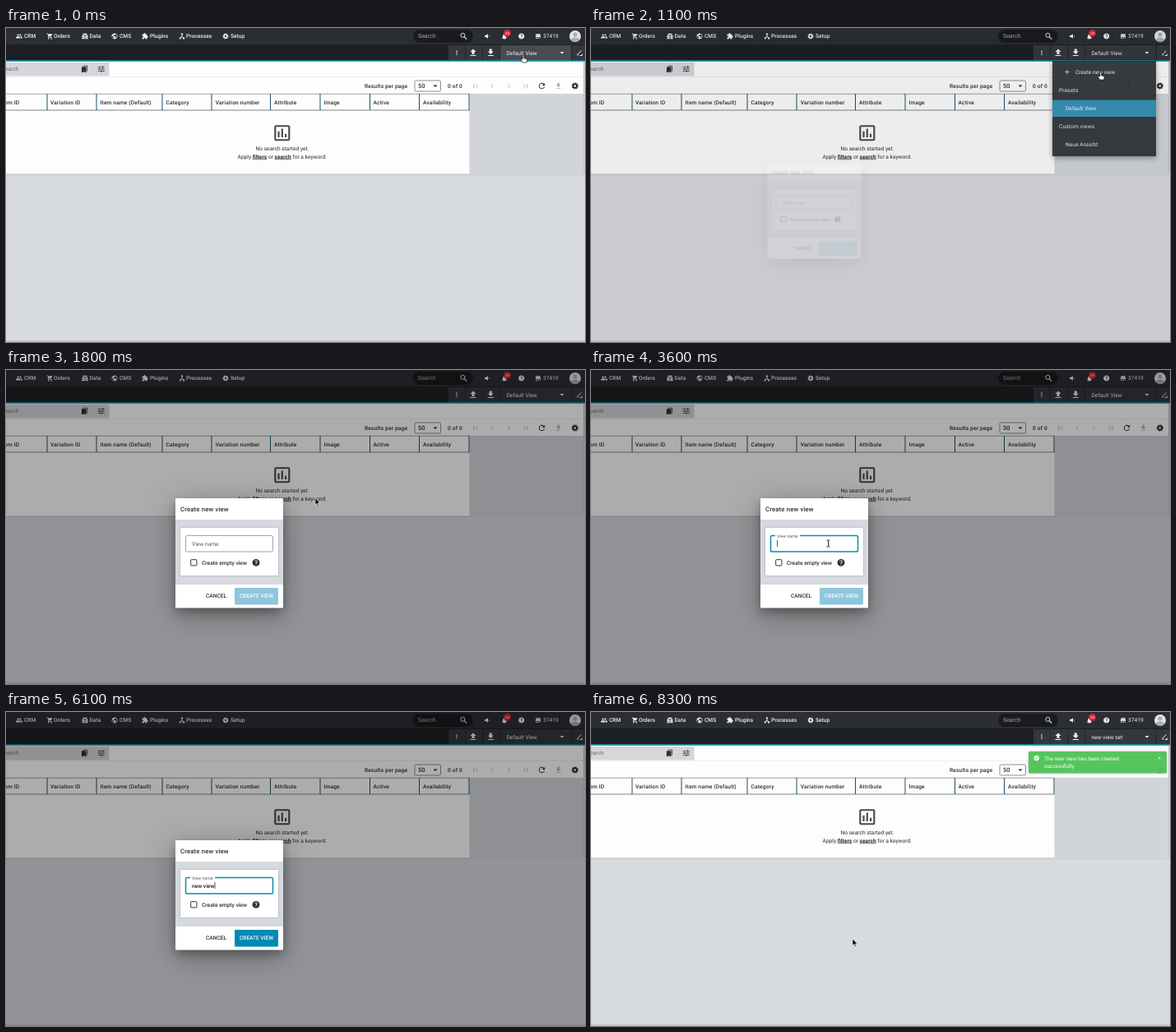
These frames come from a looping animation (704x382 px, 8400 ms). An HTML page:

```html
<!DOCTYPE html>
<html lang="en">
<head>
<meta charset="utf-8">
<title>Create new view</title>
<style>
html, body { margin: 0; width: 100%; height: 100%; overflow: hidden; background: #d7dade; }
svg { display: block; }
text { font-family: Roboto, sans-serif; font-size: 6.65px; text-rendering: geometricPrecision; white-space: pre; }
.m { font-weight: 500; }
.s { letter-spacing: .15px; }
.u { font-weight: 700; text-decoration: underline; }
#dialog { transform-origin: 271.5px 222.5px; }
#menu { transform-origin: 624px 40px; }
#box { filter: drop-shadow(0 5px 6px rgba(0,0,0,.28)) drop-shadow(0 8px 17px rgba(0,0,0,.3)); }
#menuBox { filter: drop-shadow(0 2px 3px rgba(0,0,0,.4)); }
.card { filter: drop-shadow(0 .8px 1px rgba(0,0,0,.28)); }
</style>
</head>
<body>
<svg id="stage" width="704" height="382" viewBox="0 0 704 382"></svg>
<script>
const LOOP = 8400, STEP = 100;
const INK = '#2b2c2e', LIGHT = '#f1f2f3', TEAL = '#078fa6';

const rect = (x, y, w, h, fill, more = '') =>
  `<rect x="${x}" y="${y}" width="${w}" height="${h}" fill="${fill}" ${more}/>`;
const text = (x, y, str, fill = INK, more = '') =>
  `<text x="${x}" y="${y}" fill="${fill}" ${more}>${str}</text>`;
const path = d => `<path fill-rule="evenodd" stroke="none" d="${d}"/>`;
const line = (d, w = 2) => `<path fill="none" stroke-width="${w}" d="${d}"/>`;
const ring = (r, w, more = '') => `<circle cx="12" cy="12" r="${r}" fill="none" stroke-width="${w}" ${more}/>`;

// All icons sit on a 24 unit grid.
const icons = {
  people: path('M16 11a3 3 0 1 0 0-6 3 3 0 0 0 0 6zM8 11a3 3 0 1 0 0-6 3 3 0 0 0 0 6zM8 13c-2.3 0-7 1.2-7 3.5V19h14v-2.5c0-2.3-4.7-3.5-7-3.5zM16 13l-1 .1c1.2.8 2 2 2 3.4V19h6v-2.5c0-2.3-4.7-3.5-7-3.5z'),
  cart: path('M7 18a2 2 0 1 0 .01 0zM17 18a2 2 0 1 0 .01 0zM1 2v2h2l3.6 7.6L5 14v3h14v-2H7.4l1.1-2H16l4.5-9H5.2L4.3 2z'),
  data: path('M5 3h14v4H5zM2 8.500h20V14H2zM2 15.500h20V21H2zM9 10v2h6v-2zM9 17v2h6v-2z'),
  globe: path('M12 2a10 10 0 1 0 .01 0zM11 19.900A8 8 0 0 1 4.200 10.200L9 15v1a2 2 0 0 0 2 2zM17.900 17.400A2 2 0 0 0 16 16h-1v-3a1 1 0 0 0-1-1H8v-2h2a1 1 0 0 0 1-1V7h2a2 2 0 0 0 2-2a8 8 0 0 1 2.900 12.400z'),
  puzzle: path('M20.500 11H19V7a2 2 0 0 0-2-2h-4V3.500a2.500 2.500 0 0 0-5 0V5H4a2 2 0 0 0-2 2v3.800h1.500a2.700 2.700 0 0 1 0 5.400H2V20a2 2 0 0 0 2 2h3.800v-1.500a2.700 2.700 0 0 1 5.400 0V22H17a2 2 0 0 0 2-2v-4h1.500a2.500 2.500 0 0 0 0-5z'),
  flow: path('M9 2h6v6h-2v4l5 4h3v6h-6v-5l-3-2.500L8 18v4H3v-6h3l5-4V8H9z'),
  gear: ring(5.5, 4.500) + ring(8.600, 3, 'stroke-dasharray="3.380 3.374"'),
  search: ring(0, 0) + '<circle cx="9.500" cy="9.500" r="5.500" fill="none" stroke-width="2"/>' + line('M13.500 13.500L20 20', 2.400),
  horn: path('M3 9v6h4l8 5V4L7 9zM18 8v8a5 5 0 0 0 0-8z'),
  bell: path('M12 22a2 2 0 0 0 2-2h-4a2 2 0 0 0 2 2zM18 16v-5c0-3-1.600-5.600-4.500-6.300V4a1.500 1.500 0 0 0-3 0v.7C7.600 5.400 6 8 6 11v5l-2 2v1h16v-1z'),
  store: path('M4 4h16v2H4zM20 7H4l-1 5v2h1v6h10v-6h4v6h2v-6h1v-2zM6 18v-4h6v4z'),
  help: path('M12 2a10 10 0 1 0 .01 0zM11 17h2v2h-2zM8 9.500a4 4 0 1 1 6.800 2.900C13.600 13.500 13 14 13 15.500h-2c0-2.300.8-3.300 2.200-4.500A2 2 0 1 0 10 9.500z'),
  upload: path('M5 10l7-7 7 7h-4v6H9v-6zM5 18h14v2H5z'),
  download: path('M19 9h-4V3H9v6H5l7 7zM5 18h14v2H5z'),
  more: path('M12 4a2 2 0 1 0 .01 0zM12 10a2 2 0 1 0 .01 0zM12 16a2 2 0 1 0 .01 0z'),
  drop: path('M6 9.500l6 6 6-6z'),
  edit: line('M4 18L17 4M12 20h8v-5M4 18l4 0', 2.600),
  marks: path('M19 18l2 1V3a2 2 0 0 0-2-2H9a2 2 0 0 0-2 2h10a2 2 0 0 1 2 2zM15 5H5a2 2 0 0 0-2 2v16l7-3 7 3V7a2 2 0 0 0-2-2z'),
  tune: path('M3 17v2h6v-2zM3 5v2h10V5zM13 21v-2h8v-2h-8v-2h-2v6zM7 9v2H3v2h4v2h2V9zM21 13v-2H11v2zM15 9h2V7h4V5h-4V3h-2z'),
  first: line('M17.500 6.500L12 12l5.500 5.500M7 6v12'),
  prev: line('M15 6.500L9.500 12l5.500 5.500'),
  next: line('M9 6.500l5.500 5.500L9 17.500'),
  last: line('M6.500 6.500L12 12l-5.500 5.500M17 6v12'),
  refresh: path('M17.650 6.350A8 8 0 1 0 19.700 14h-2.100A6 6 0 1 1 12 6c1.700 0 3.100.7 4.200 1.800L13 11h7V4z'),
  chart: path('M9 17H7v-7h2zM13 17h-2V7h2zM17 17h-2v-4h2zM19 19H5V5h14zM19 3H5a2 2 0 0 0-2 2v14a2 2 0 0 0 2 2h14a2 2 0 0 0 2-2V5a2 2 0 0 0-2-2z'),
  plus: line('M12 5v14M5 12h14'),
  check: path('M12 2a10 10 0 1 0 .01 0zM10 17l-5-5 1.400-1.400L10 14.200l7.600-7.600L19 8z'),
  close: line('M6 6l12 12M18 6L6 18', 3)
};
const icon = (name, cx, cy, size, color = LIGHT) =>
  `<g transform="translate(${cx - size / 2} ${cy - size / 2}) scale(${size / 24})" fill="${color}" stroke="${color}">${icons[name]}</g>`;

function header() {
  const nav = [['people', 16, 22, 'CRM'], ['cart', 53.5, 58, 'Orders'], ['data', 96, 101.500, 'Data'],
    ['globe', 132, 138, 'CMS'], ['puzzle', 169, 175, 'Plugins'], ['flow', 214, 219, 'Processes'], ['gear', 267, 273, 'Setup']];
  return rect(0, 0, 704, 20, '#2b2e33') + rect(0, 20, 704, 20, '#1d1f22') +
    nav.map(([name, x, tx, label]) => icon(name, x, 10, 8.500) + text(tx, 12.400, label, LIGHT, 'class="m"')).join('') +
    rect(495, 2, 73, 16, '#191b1e', 'rx="8"') + text(501, 12.400, 'Search', '#a6a8aa', 'style="font-size:7px"') +
    icon('search', 556.500, 10, 11) + icon('horn', 585, 10, 8) + icon('bell', 606, 10.500, 8.500) +
    '<circle cx="609.500" cy="6.300" r="4.400" fill="#e0242f"/>' +
    text(609.500, 8, '34', '#fff', 'text-anchor="middle" style="font-size:4.500px"') +
    icon('help', 626.700, 10, 8.600) + icon('store', 647, 10, 8) + text(653, 12.400, '37419', LIGHT) +
    '<circle cx="692" cy="10" r="7" fill="#e4e5e6"/><circle cx="692" cy="8" r="2.600" fill="#aaacae"/>' +
    '<path d="M686.700 14.600c1-4 9.600-4 10.600 0a7 7 0 0 1-10.600 0z" fill="#aaacae"/>' +
    rect(538, 21, 166, 18.500, '#34373c') + rect(601, 21, 86, 18.500, '#484b50', 'id="hover"') +
    [558, 579, 600, 687].map(x => rect(x, 21, .8, 18.500, '#202226')).join('') +
    icon('more', 548, 30, 8.500) + icon('upload', 568, 30, 12) + icon('download', 589.300, 30, 12) +
    text(608.500, 32.600, 'Default View', LIGHT, 'id="viewName"') + icon('drop', 676, 30, 10) + icon('edit', 697.500, 30.500, 9) +
    rect(0, 39.200, 704, 1.600, '#179bbd');
}

function table() {
  const cols = [[50, 'Variation ID', 54], [110, 'Item name (Default)', 114.500], [190, 'Category', 194.500],
    [250, 'Variation number', 254.800], [321.500, 'Attribute', 326], [382, 'Image', 386.500],
    [442.500, 'Active', 446.500], [502.500, 'Availability', 507], [563, '', 0]];
  const pager = [['first', 571], ['prev', 591], ['next', 611.500], ['last', 631.500]];
  return rect(-5, 41, 707, 136.500, '#fdfdfd', 'class="card"') + rect(563.500, 80, 138.500, 97.500, '#d1d4d9') +
    rect(0, 42, 125.500, 16.500, '#d4d6da') + rect(0, 59, 702, .6, '#e4e5e7') +
    text(15.300, 52.400, 'Search', '#66686b', 'text-anchor="end"') +
    icon('marks', 95.500, 50, 9.500) .replaceAll(LIGHT, INK) + icon('tune', 115.800, 50, 10.500, INK) +
    text(436, 73, 'Results per page', INK, 'class="m s"') +
    rect(497, 64, 31.500, 13, '#fff', 'rx="1.500" stroke="#6f7174" stroke-width=".8"') +
    text(501, 73.200, '50', INK, 'class="m" style="font-size:7.400px"') + icon('drop', 522, 70.500, 10, INK) +
    text(537, 73, '0 of 0', INK, 'class="m s"') +
    pager.map(([name, x]) => icon(name, x, 70.500, 11, '#b4b6b9')).join('') +
    icon('refresh', 651.500, 70.500, 11, INK) + icon('download', 671.700, 70.500, 10, '#b0b2b5') + icon('gear', 691.800, 70.500, 10, INK) +
    rect(0, 79.800, 563.500, .7, '#77797c') + rect(0, 99.600, 563.500, .8, '#626467') +
    text(16.200, 93.100, 'Item ID', INK, 'class="m s" text-anchor="end"') +
    cols.map(([x, label, tx]) => rect(x - .5, 80, 1, 20, '#1f5068') + text(tx, 93.100, label, INK, 'class="m s"')).join('') +
    icon('chart', 335.800, 127.800, 25.500, '#47494c') +
    text(336, 149.200, 'No search started yet.', INK, 'text-anchor="middle"') +
    text(335.800, 158.500, 'Apply <tspan class="u">filters</tspan> or <tspan class="u">search</tspan> for a keyword.', INK, 'text-anchor="middle"') +
    rect(0, 380.600, 704, .8, '#a3a6aa');
}

const menu = () => '<g id="menu">' + rect(561, 40, 126, 116, '#2f3237', 'id="menuBox"') +
  icon('plus', 579, 53.500, 9) + text(589, 56, 'Create new view', LIGHT) +
  text(569, 78.200, 'Presets', LIGHT, 'class="s"') + rect(561, 87.500, 126, 20.500, '#2d8fb6') +
  text(577, 100.200, 'Default View', '#fff') + text(569, 122.300, 'Custom views', LIGHT, 'class="s"') +
  text(577, 144.300, 'Neue Ansicht', LIGHT) + '</g>';

const dialog = () => '<g id="dialog">' + rect(206, 156, 131, 133.500, '#fff', 'id="box" rx="1"') +
  rect(206, 182, 131, 79, '#d6d9de') + text(212, 171.700, 'Create new view', INK, 'class="m" style="font-size:7.700px;letter-spacing:.17px"') +
  rect(212, 192, 119, 58, '#fff', 'class="card"') +
  rect(218.500, 201.500, 106, 19.500, '#fff', 'id="field" rx="1.800"') + rect(224, 199.500, 30, 5, '#fff', 'id="notch"') +
  text(226, 213.500, 'View name', '#55575a', 'id="label"') +
  text(226, 213.500, '', '#1c1d1f', 'id="typed" class="m"') + rect(226, 207, .7, 8, '#111', 'id="caret"') +
  rect(224.700, 230.700, 7.200, 7.200, '#fff', 'rx=".6" stroke="#333" stroke-width="1"') +
  text(238, 236.700, 'Create empty view', INK, 'class="m"') + icon('help', 304, 234.300, 10.500, INK) +
  text(243, 277.400, 'CANCEL', INK, 'class="m"') + rect(278, 265, 53, 20.500, '#8fc6dc', 'id="button" rx="1"') +
  '<clipPath id="clip"><rect x="278" y="265" width="53" height="20.500" rx="1"/></clipPath>' +
  '<circle id="ripple" cx="318" cy="276" fill="#000" fill-opacity=".12" clip-path="url(#clip)"/>' +
  text(304.500, 277.400, 'CREATE VIEW', '#fff', 'class="m" text-anchor="middle" style="font-size:6.550px"') + '</g>';

const toast = () => '<g id="toast">' + rect(532, 48, 168, 26.500, '#52c459', 'rx="1.500" class="card"') +
  icon('check', 541.700, 56, 8, '#fff') + text(551, 58.700, 'The new view has been created', '#fff', 'style="font-size:6.550px"') +
  text(551, 68.300, 'successfully.', '#fff', 'style="font-size:6.550px"') + icon('close', 691, 56.200, 5.500, '#fff') + '</g>';

const pointer = () => '<g id="pointer">' +
  '<path id="hand" d="M-.9.8c0-1.200 1.700-1.200 1.700 0v3l3 .8c.8.2 1 .7.9 1.400L4.100 9H-.8L-3 5.600c-.5-.8.5-1.500 1.200-.9l.9.8z" fill="#fff" stroke="#111" stroke-width=".7"/>' +
  '<path id="arrow" d="M0 0v8.200l1.900-1.800 1.300 3 1.300-.6-1.300-2.900h2.600z" fill="#000" stroke="#fff" stroke-width=".6"/>' +
  '<path id="beam" d="M-2-4h1.400L0-3.500.6-4H2M0-3.500v7M-2 4h1.400L0 3.500.6 4H2" fill="none" stroke="#111" stroke-width=".9"/></g>';

const stage = document.getElementById('stage');
stage.innerHTML = rect(0, 0, 704, 382, '#d7dade') + table() + header() + menu() +
  rect(0, 0, 704, 382, '#000', 'id="shade"') + dialog() + toast() + pointer();

const el = {};
stage.querySelectorAll('[id]').forEach(node => el[node.id] = node);

const ramp = (t, a, b) => Math.min(1, Math.max(0, (t - a) / (b - a)));
const ease = p => p * p * (3 - 2 * p);
const mix = (a, b, p) => a + (b - a) * p;
const blend = (a, b, p) => `rgb(${a.map((v, i) => Math.round(mix(v, b[i], p)))})`;
const show = (node, on) => node.setAttribute('visibility', on ? 'visible' : 'hidden');
const fade = (node, p) => { node.style.opacity = p; show(node, p > 0); };

const NAME = 'new view set';
const keys = [4300, 4700, 4800, 4900, 5500, 5800, 5900, 6000, 6300, 6400, 6600, 6700];
const moves = [[400, 900, 629, 33, 619.500, 54], [1100, 1800, 619.500, 54, 376, 156],
  [2800, 3300, 376, 156, 288.500, 211], [7300, 7800, 288.500, 211, 318, 276]];
const shapes = [[0, 'hand'], [1200, 'arrow'], [3200, 'beam'], [4000, ''], [7400, 'beam'], [7500, 'arrow'], [7700, 'hand'], [8100, 'arrow']];

function movePointer(t) {
  const [a, b, x0, y0, x1, y1] = moves.filter(m => m[0] <= t).pop() || moves[0];
  const p = ease(ramp(t, a, b));
  el.pointer.setAttribute('transform', `translate(${mix(x0, x1, p)} ${mix(y0, y1, p)})`);
  const shape = shapes.filter(s => s[0] <= t).pop()[1];
  for (const name of ['hand', 'arrow', 'beam']) show(el[name], name === shape);
}

function drawField(t) {
  const float = ramp(t, 3280, 3430), focus = t >= 3300 && t < 7800;
  el.field.setAttribute('stroke', focus ? TEAL : '#8a8c8f');
  el.field.setAttribute('stroke-width', focus ? 1.500 : .8);
  el.notch.style.opacity = float;
  el.label.setAttribute('y', mix(213.500, 203.500, float));
  el.label.style.fontSize = mix(6.650, 5.200, float) + 'px';
  el.typed.textContent = NAME.slice(0, keys.filter(k => k <= t).length);
  el.caret.setAttribute('x', 226.300 + el.typed.getComputedTextLength());
  show(el.caret, (t >= 3400 && t < 4000) || (t >= 4300 && t < 7200));
}

function render(t) {
  const open = ramp(t, 1080, 1230), close = 1 - ramp(t, 8000, 8150);
  const menuIn = ramp(t, 150, 290);
  show(el.hover, t < 300);
  fade(el.menu, menuIn * (1 - ramp(t, 1090, 1250)));
  el.menu.style.transform = `scale(1, ${mix(.8, 1, menuIn)})`;
  fade(el.shade, .32 * ramp(t, 1050, 1300) * (1 - ramp(t, 8000, 8250)));
  // The children's own visibility must not outlive the dialog.
  el.dialog.style.display = open * close > 0 ? '' : 'none';
  el.dialog.style.opacity = open * close;
  el.dialog.style.transform = `scale(${mix(.85, 1, open)})`;
  if (open * close > 0) drawField(t);
  const press = ramp(t, 7750, 8050);
  el.button.setAttribute('fill', blend([143, 198, 220], [0, 137, 178], ramp(t, 4260, 4420)));
  el.ripple.setAttribute('r', 55 * press);
  el.viewName.textContent = t >= 8200 ? NAME : 'Default View';
  fade(el.toast, .97 * ramp(t, 8120, 8290));
  movePointer(t);
}

const start = performance.now();
function tick() {
  const t = (performance.now() - start) % LOOP;
  render(Math.floor(t / STEP) * STEP);
  requestAnimationFrame(tick);
}
tick();
</script>
</body>
</html>
```
